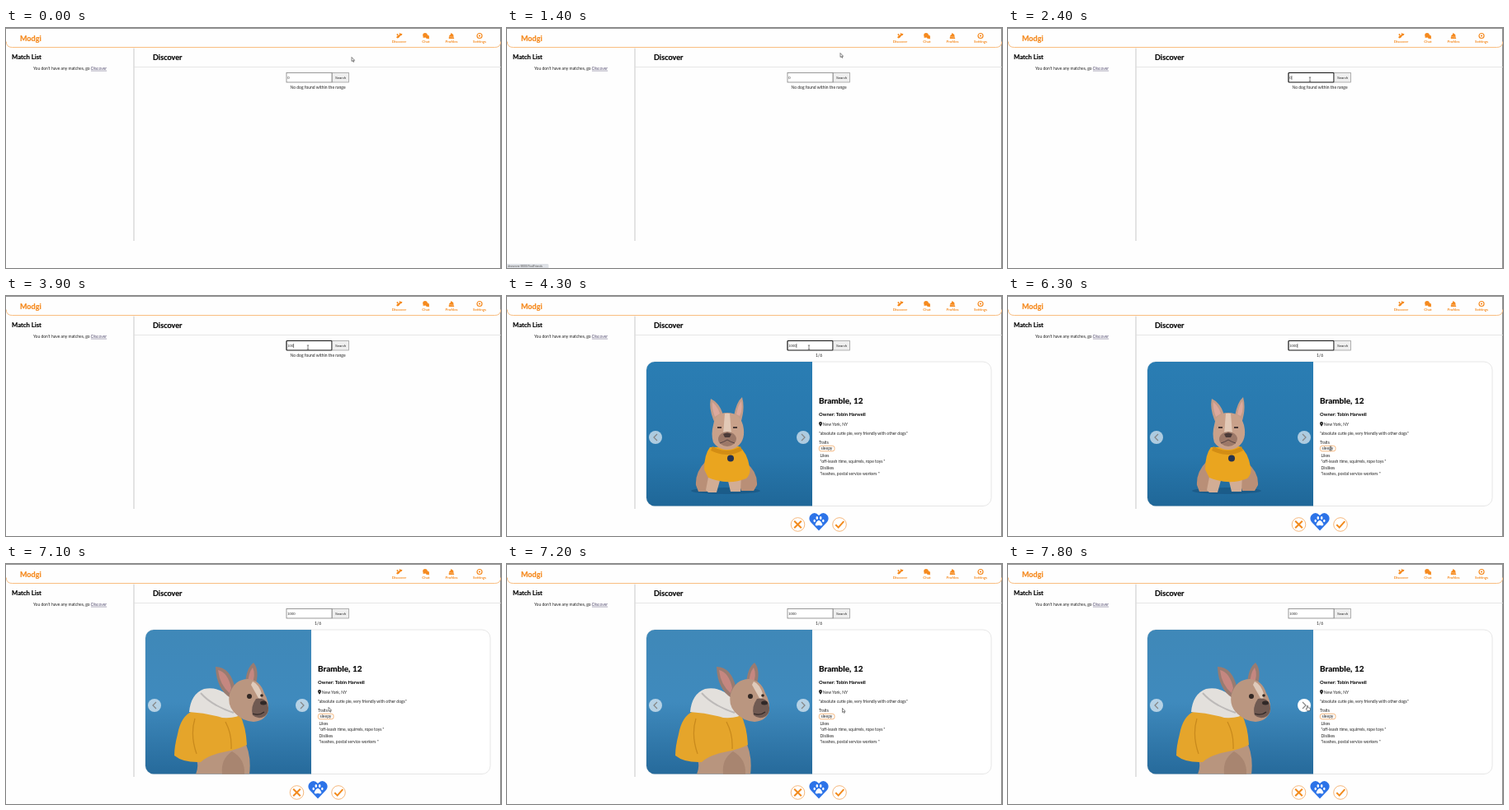
An HTML page that plays this animation: 600 by 292 pixels, repeating every 8 s.

```html
<!DOCTYPE html>
<html lang="en">
<head>
<meta charset="utf-8">
<title>Discover</title>
<style>
  html, body { margin: 0; width: 100%; height: 100%; overflow: hidden; background: #fff; }
  svg { display: block; width: 100%; height: 100%; }
  text { font: 5px Lato, sans-serif; fill: #222; white-space: pre; }
  .h1 { font-size: 10px; font-weight: 700; fill: #000; }
  .h2 { font-size: 7.7px; font-weight: 700; fill: #000; }
  .h3 { font-size: 5.85px; font-weight: 700; fill: #000; }
  .h1, .h2 { stroke: #000; stroke-width: .15; }
  .title { font-size: 9.1px; }
  .brand { font-size: 9px; font-weight: 700; fill: #f58a1f; stroke: #f58a1f; stroke-width: .2; }
  .nav { font-size: 4.5px; font-weight: 700; fill: #f58a1f; text-anchor: middle; }
  .mid { text-anchor: middle; }
  .ui { font: 4.17px "Liberation Sans", Arial, sans-serif; }
  .status { font: 3.4px Roboto, sans-serif; fill: #555; }
  .icon { fill: #f58a1f; }
</style>
</head>
<body>
<svg viewBox="0 0 600 292" preserveAspectRatio="none">
  <defs>
    <clipPath id="photoClip"><path d="M370 80H179a10 10 0 0 0-10 10v155.500a10 10 0 0 0 10 10H370z"/></clipPath>
    <linearGradient id="deepBlue" x2="0" y2="1">
      <stop stop-color="#2a7db3"/><stop offset=".65" stop-color="#2877ac"/><stop offset="1" stop-color="#1f6798"/>
    </linearGradient>
    <linearGradient id="lightBlue" x2="0" y2="1">
      <stop stop-color="#3f88b8"/><stop offset=".5" stop-color="#3f8abd"/><stop offset="1" stop-color="#266a9b"/>
    </linearGradient>
  </defs>
  <rect width="600" height="292" fill="#fefefe"/>

  <!-- page frame -->
  <path d="M0 .4H600" stroke="#666" stroke-width=".8"/>
  <path d="M599.500 0V292" stroke="#8a8a8a"/>
  <path d="M.3 16.500q0 7 7 7H592.700q7 0 7-7" fill="none" stroke="#f9bd80"/>
  <path d="M155 24.500V259" stroke="#bbb" stroke-width=".8"/>
  <path d="M155 47.500H600" stroke="#ddd" stroke-width=".7"/>
  <text class="brand" x="17" y="15.800">Modgi</text>
  <g class="icon">
    <path d="M473.200 11.800l.8-2 3-1.700-.3-2.300 1.500 1 2.200.2-.6 1.700-1.800.7-2 2.500-1.700.7z"/>
    <circle cx="474.500" cy="8" r="1"/>
    <circle cx="508" cy="8.700" r="2.800"/><circle cx="510.800" cy="10.800" r="2.200"/>
    <path d="M505.500 12l.6-3 2 2.200zM513 13.400l-.5-2.500-2 1.500z"/>
    <path d="M536.800 13q-.3-4.500 2.200-5l.2-2 1.300.8 1.700 1.200.3 2.200.8 2.800z"/>
    <path d="M536.700 10.600l6.500.8" stroke="#fff" stroke-width=".4"/>
    <circle cx="574" cy="9.500" r="3" fill="none" stroke="#f58a1f" stroke-width="1.200"/>
    <circle cx="574" cy="9.500" r="1.100"/>
  </g>
  <text class="nav" x="476.500" y="17.600">Discover</text>
  <text class="nav" x="509" y="17.600">Chat</text>
  <text class="nav" x="540" y="17.600">Profiles</text>
  <text class="nav" x="574" y="17.600">Settings</text>
  <text class="h2" x="7" y="38">Match List</text>
  <text x="33" y="50.800">You don't have any matches, go <tspan fill="#5b5476" text-decoration="underline">Discover</tspan></text>
  <text class="h1 title" x="178" y="39.200">Discover</text>

  <!-- search -->
  <rect id="field" x="340" y="54.500" width="55" height="11.500" fill="#fff"/>
  <text id="query" class="ui" x="341.300" y="61.700"></text>
  <path id="caret" d="M0 58v5" stroke="#000" stroke-width=".5"/>
  <rect x="395.500" y="54.500" width="20" height="11.500" fill="#efefef" stroke="#909090" stroke-width=".7"/>
  <text class="ui mid" x="405.500" y="61.700">Search</text>
  <text id="result" class="mid" x="378" y="73.500"></text>

  <!-- profile card -->
  <g id="card">
    <rect x="169" y="80" width="418" height="175.500" rx="10" fill="#fff" stroke="#dcdcdc" stroke-width=".7"/>
    <g clip-path="url(#photoClip)">
      <g id="frontPhoto">
        <rect x="169" y="80" width="201" height="176" fill="url(#deepBlue)"/>
        <ellipse cx="265" cy="237" rx="42" ry="4" fill="#174f78" opacity=".55"/>
        <path d="M241 201q-13 13-12 29l3 8h14l7-17zM290 203q14 11 13 27l-4 7h-15l-5-17z" fill="#b98f77"/>
        <path d="M245 215l-4 21 3 3h10l5-18 8 0 4 17h12l1-22z" fill="#d2ad95"/>
        <path d="M246 184q-7 9-7 27l5 10q24 10 46 1 6-6 4-14-3-18-13-25z" fill="#eaa51f"/>
        <path d="M249 183q18 10 34 0l2 5q-18 10-38 0z" fill="#d38d14"/>
        <path d="M252 155q-8-18-5-30 11 5 15 20zM275 146q3-17 10-23 4 14-2 32z" fill="#c39c88"/>
        <path d="M252 147q-4-10-3-18 6 5 9 14zM278 144q2-11 6-16 2 10-2 18z" fill="#dca99d"/>
        <path d="M250 157q2-15 17-15t19 15q3 13-2 21-6 9-17 9t-17-9q-3-10 0-21z" fill="#c9a18a"/>
        <path d="M264 143h6l2 25h-10z" fill="#e2c9b7"/>
        <ellipse cx="267" cy="174" rx="11" ry="9" fill="#9c7868"/>
        <path d="M262 168q5-3 10 0l-2 4h-6z" fill="#4b3a38"/>
        <path d="M258 179q4-1 9-4 5 3 9 4" fill="none" stroke="#564342"/>
        <path d="M255 160h5M274 160h5" stroke="#493936" stroke-width="2.200"/>
        <circle cx="271" cy="197.500" r="4" fill="#26334f"/>
      </g>
      <g id="sidePhoto">
        <rect x="169" y="80" width="201" height="176" fill="url(#lightBlue)"/>
        <path d="M229 235q6 8 1 21h65q3-24-7-43l-40 6z" fill="#b8957e"/>
        <path d="M262 256q-2-19 12-28 16 9 15 28z" fill="#a88570"/>
        <path d="M226 179q-14 6-18 28-4 15-4 26 11 9 32 8 8-8 27-12 17-3 29-9-1-22-9-38z" fill="#e5a52b"/>
        <path d="M229 188q-6 20 2 43M266 192q8 15 7 33" fill="none" stroke="#c98a1c" stroke-width="1.300"/>
        <path d="M222 180q2-22 18-28 18-4 34 12l12 18q-5 6-24 5-20-6-40-7z" fill="#e3e0dc"/>
        <path d="M236 157q13 15 40 24" fill="none" stroke="#bdbab9" stroke-width="2"/>
        <path d="M272 163q-17-11-18-38 18 0 24 27zM290 146q1-19 10-26 8 9 2 30z" fill="#997b70"/>
        <path d="M271 157q-12-10-14-28 12 3 16 22zM293 146q1-14 6-20 4 9-1 20z" fill="#c58780"/>
        <path d="M271 158q6-18 22-18 15 1 20 17 6 10 5 22-4 12-18 13-14-1-24-12-8-9-5-22z" fill="#ba9680"/>
        <path d="M299 143q8 3 12 18l-4 4-10-18z" fill="#dfcbbb"/>
        <path d="M303 164q10-2 14 6 3 10-3 15-8 5-15-1-3-10 4-20z" fill="#705a52"/>
        <ellipse cx="312" cy="169" rx="4" ry="2.500" fill="#302827"/>
        <circle cx="295" cy="161" r="3" fill="#322824"/>
        <circle cx="310" cy="160" r="1.800" fill="#322824"/>
        <path d="M299 182q8 3 14-2" fill="none" stroke="#332a28" stroke-width="1.200"/>
      </g>
      <circle cx="180" cy="172" r="8" fill="#fff" opacity=".62"/>
      <circle id="next" cx="359" cy="172" r="8" fill="#fff"/>
      <path d="M182 168l-4 4 4 4M357 168l4 4-4 4" fill="none" stroke="#858585" stroke-width="1.200"/>
    </g>
    <text class="h1" x="378" y="131.200">Bramble, 12</text>
    <text class="h3" x="378" y="146">Owner: Tobin Harwell</text>
    <path d="M380 158.800q-2-2.400-2-3.700a2 2 0 0 1 4 0q0 1.300-2 3.700z" fill="#111"/>
    <circle cx="380" cy="155.100" r=".7" fill="#fff"/>
    <text x="382.800" y="158">New York, NY</text>
    <text x="378" y="168.800">"absolute cutie pie, very friendly with other dogs"</text>
    <text x="378" y="179.700">Traits</text>
    <rect x="378.300" y="182.300" width="18.700" height="6.500" rx="2.500" fill="#fff" stroke="#ef9b4d" stroke-width=".7"/>
    <text x="380.500" y="187.300">sleepy</text>
    <text x="379.500" y="195.600">Likes</text>
    <text x="379.500" y="203">"off-leash time, squirrels, rope toys "</text>
    <text x="379.500" y="210.600">Dislikes</text>
    <text x="379.500" y="218">"leashes, postal service workers "</text>
    <g fill="#fff" stroke="#f3a65c" stroke-width=".8">
      <circle cx="352.500" cy="278" r="8.300"/><circle cx="403" cy="278" r="8.300"/>
    </g>
    <path d="M348.200 273.700l8.600 8.600m0-8.600l-8.600 8.600M398.300 278.200l3.400 3.400 6.600-7.400" fill="none" stroke="#f28a1c" stroke-width="2"/>
    <path d="M378 285.500L368 275q-3-4-.5-8 5-6 10.500 0 5.500-6 10.500 0 2.500 4-.5 8z" fill="#2c73e8"/>
    <g fill="#fff">
      <path d="M378 273q2 0 4 4 1 2.500-1.500 2.500-2.500-.8-5 0-2.500 0-1.500-2.500 2-4 4-4z"/>
      <ellipse cx="375.800" cy="270" rx="1.300" ry="1.900"/><ellipse cx="380.200" cy="270" rx="1.300" ry="1.900"/>
      <ellipse cx="372.700" cy="273.500" rx="1.200" ry="1.700"/><ellipse cx="383.300" cy="273.500" rx="1.200" ry="1.700"/>
    </g>
  </g>

  <g id="status">
    <path d="M0 287h49q1.500 0 1.500 1.500V292H0z" fill="#dee1e6"/>
    <text class="status" x="1" y="291">devserver:9000/FindFriends</text>
  </g>

  <g id="pointer" stroke-linejoin="round">
    <path id="arrow" d="M0 0v5l1.200-1 .9 1.900.8-.4-.8-1.700h1.500z" fill="#fff" stroke="#222" stroke-width=".55"/>
    <path id="hand" d="M-.6 0q.6-.7 1.200 0v2l2.400.6q.6.300.4 1.300l-.6 2.100h-3L-2 3.600q.2-.8 1.400 0z" fill="#fff" stroke="#222" stroke-width=".55"/>
    <path id="beam" d="M-1.200-2.500h2.400M0-2.500v5M-1.200 2.500h2.400" fill="none" stroke="#333" stroke-width=".6"/>
  </g>
</svg>
<script>
  const LOOP = 8000, STEP = 100;
  const FOCUS = 2200, RESULTS = 4300, NEXT_CLICK = 6800;
  const $ = id => document.getElementById(id);
  const show = (id, on) => $(id).style.display = on ? "" : "none";
  const within = (t, from, to) => t >= from && t < to;

  // time, x, y: up to the menu, into the field, two loops over the photo, then the arrow
  const path = [
    [0, 419, 35.5], [100, 419, 35.5], [600, 477, 12], [1000, 478, 11], [1100, 474, 12],
    [1400, 404, 30.5], [1900, 405, 65], [2200, 367, 63], [2400, 366, 62.5], [4900, 366, 62.5],
    [5100, 250, 110], [5300, 222, 165], [5500, 290, 240], [5650, 382, 190], [5800, 330, 112],
    [5950, 230, 112], [6050, 173, 170], [6150, 270, 255], [6300, 391, 185.5],
    [6600, 360, 172], [6900, 360, 172], [7200, 406.5, 175.5], [7400, 467, 200],
    [7600, 385, 176], [7700, 363, 173], [8000, 363, 172]
  ];
  const keys = [[0, "0"], [2600, ""], [3200, "1"], [3500, "10"], [3900, "100"], [4200, "1000"]];

  function pointerAt(t) {
    const i = path.findIndex(p => p[0] > t);
    const [t0, x0, y0] = path[i - 1], [t1, x1, y1] = path[i];
    const u = (t - t0) / (t1 - t0);
    return [x0 + (x1 - x0) * u, y0 + (y1 - y0) * u];
  }

  function pointerShape(t) {
    if (within(t, 500, 1200) || within(t, 6600, 7000) || t >= 7700) return "hand";
    if (within(t, 2100, 5000) || within(t, 6300, 6500)) return "beam";
    return "arrow";
  }

  function render(t) {
    const [keyTime, typed] = keys.filter(k => k[0] <= t).pop();
    const focused = within(t, FOCUS, NEXT_CLICK);
    const blinkStart = Math.max(keyTime, FOCUS);
    const caretOn = Math.floor((t - blinkStart) / 500) % 2 === 0;
    $("query").textContent = typed;
    $("caret").setAttribute("transform", `translate(${341.6 + typed.length * 2.32} 0)`);
    show("caret", focused && caretOn);
    $("field").setAttribute("stroke", focused ? "#111" : "#808080");
    $("field").setAttribute("stroke-width", focused ? 1.2 : 0.8);
    $("field").setAttribute("rx", focused ? 0.8 : 0);

    const found = t >= RESULTS;
    $("result").textContent = found ? "1/6" : "No dog found within the range";
    show("card", found);
    show("frontPhoto", t < NEXT_CLICK);
    show("sidePhoto", t >= NEXT_CLICK);
    show("status", within(t, 500, 1600));

    const [x, y] = pointerAt(t), shape = pointerShape(t);
    $("next").setAttribute("opacity", found && shape === "hand" ? 1 : 0.62);
    $("pointer").setAttribute("transform", `translate(${x} ${y})`);
    for (const id of ["arrow", "hand", "beam"]) show(id, id === shape);
  }

  const start = performance.now();
  function tick() {
    const t = (performance.now() - start) % LOOP;
    render(Math.floor(t / STEP) * STEP);
    requestAnimationFrame(tick);
  }
  tick();
</script>
</body>
</html>
```
